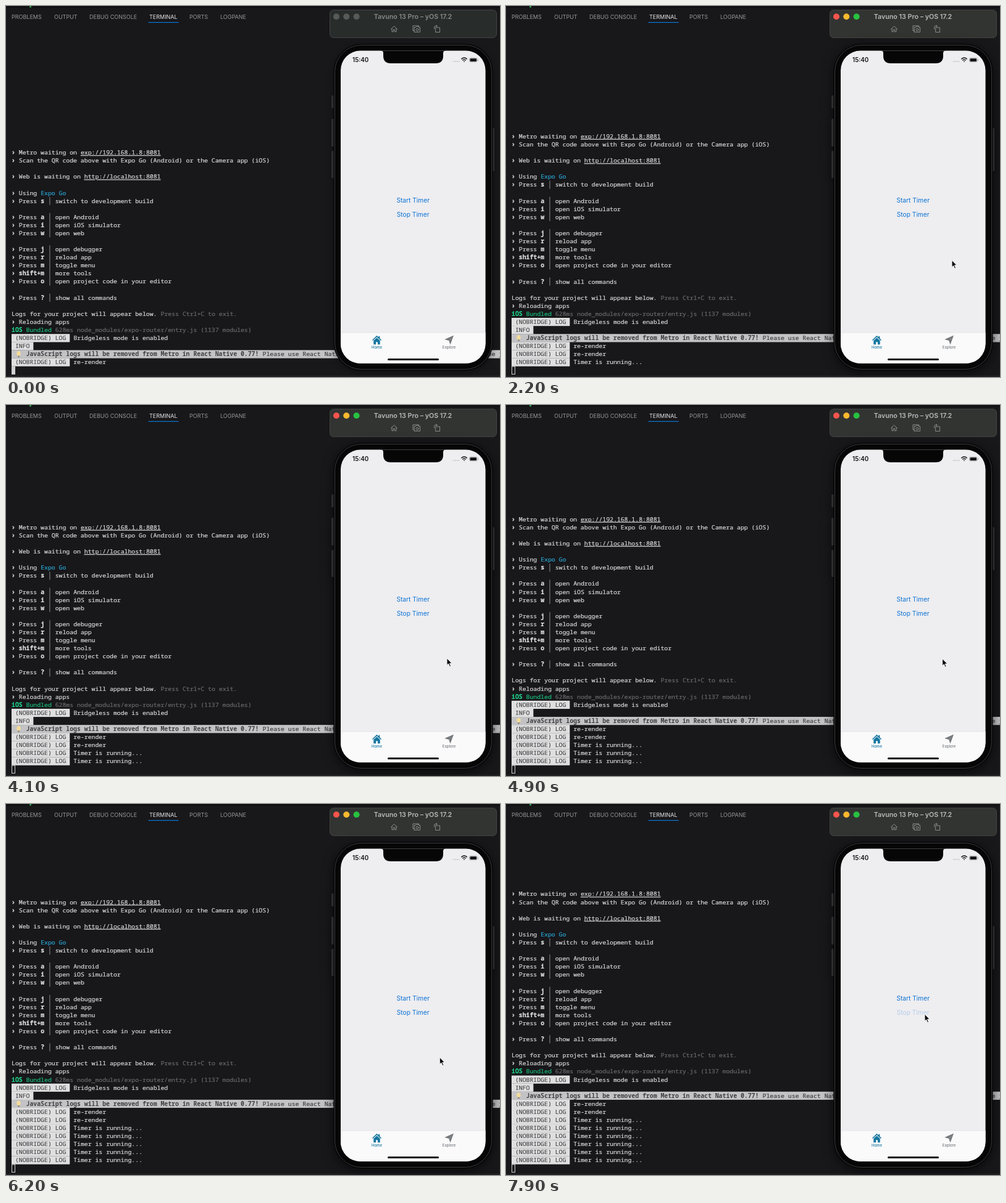
Write an HTML page that moves like this. It is 800 by 602 pixels and loops after 8 s.

```html
<!DOCTYPE html>
<html lang="en">
<head>
<meta charset="utf-8">
<title>Timer log</title>
<style>
  html, body { margin: 0; width: 100%; height: 100%; overflow: hidden; background: #18171a; }
  svg { display: block; width: 800px; height: 602px; }
  text { white-space: pre; font-family: Inter, "Open Sans", sans-serif; }
  .mid { text-anchor: middle; }
  .term text {
    font: 500 9.82px "Noto Sans Mono", "DejaVu Sans Mono", monospace;
    color: #d6d6d6; fill: currentColor; stroke: currentColor; stroke-width: .22px;
  }
  .term .b { font-weight: 700; color: #dedede; }
  .term .dim { color: #69696b; }
  .term .link { text-decoration: underline; }
  .term .cyan { color: #29a3cf; }
  .term .green { color: #17b978; }
  .term .ios { color: #1fd08a; font-weight: 700; }
  .term .tag { color: #4c4c4e; }
  .term .warn { color: #414144; font-weight: 700; stroke: none; }
  .term .note { color: #414144; }
  .tabs text { font-size: 9px; fill: #969698; }
  .tabs .on { fill: #e6e6e6; }
  .icons { fill: none; stroke: #929594; stroke-width: .9; stroke-linejoin: round; stroke-linecap: round; }
  .btn { font-size: 10.2px; fill: #0a73d5; }
</style>
</head>
<body>
<svg viewBox="0 0 800 602">
  <rect width="800" height="602" fill="#18171a"/>
  <rect width="800" height="3" fill="#111113"/>
  <rect x="38" width="3" height="2.5" fill="#2c9c4a"/>
  <rect y="600" width="800" height="1" fill="#29282b"/>
  <g class="tabs" id="tabs"></g>
  <rect x="230.5" y="26" width="49" height="1.2" fill="#0a78d4"/>

  <g class="term"><g id="rows"></g></g>
  <rect id="caret" x="9.5" y="585" width="5" height="12.500" stroke="#d0d0d0"/>

  <rect id="barFill" x="524.5" y="6.5" width="270" height="45" rx="6" stroke="#424443"/>
  <g id="lights"></g>
  <text id="title" class="mid" x="659" y="20.500" font-size="10.700" font-weight="600">Tavuno 13 Pro – yOS 17.2</text>
  <g class="icons">
    <path d="M623.5 37.5l5-4.800 5 4.800M625 36.500v5.300h2.400v-3.400h2.200v3.400h2.400v-5.300"/>
    <path d="M661.500 40h-2.500v-8h9.500v2M661.500 34.500h2l1-1.300h3l1 1.300h2v7.800h-9z"/>
    <circle cx="666" cy="38.400" r="2"/>
    <path d="M696 35h6.500v7.500h-6.500zM693.500 37v-2.500q0-2 2-2h2.500M696.600 31l1.600 1.500-1.600 1.500"/>
  </g>

  <g id="phone">
    <g fill="#2c2c2e">
      <rect x="527" y="145" width="5" height="21" rx="1.500"/>
      <rect x="527" y="183" width="5" height="45" rx="1.500"/>
      <rect x="527" y="235" width="5" height="44" rx="1.500"/>
      <rect x="787" y="198" width="4" height="70" rx="1.500"/>
    </g>
    <rect x="530.500" y="61.500" width="258" height="530" rx="45" fill="#060607"/>
    <rect x="532.500" y="63.500" width="254" height="526" rx="43" fill="none" stroke="#3a3a3d"/>
  </g>
  <clipPath id="screen"><rect x="542" y="72.500" width="234.500" height="507.500" rx="32"/></clipPath>
  <g clip-path="url(#screen)">
    <rect x="542" y="72" width="235" height="508" fill="#eeedf0"/>
    <rect x="542" y="530" width="235" height="50" fill="#fafafb"/>
    <rect x="542" y="529.700" width="235" height=".6" fill="#d9d9dc"/>
    <path d="M607 72v.5q4 0 4 4v4.500q0 12 12 12h73q12 0 12-12v-4.500q0-4 4-4v-.5z" fill="#060607"/>
  </g>
  <text x="561" y="91.300" font-size="9.800" font-weight="600" fill="#111">15:40</text>
  <g fill="#a9a9ad" id="dots"></g>
  <path d="M737.300 86.200q4.700-4.400 9.400 0" fill="none" stroke="#111" stroke-width="1.500"/>
  <path d="M739.200 88.300q2.800-2.600 5.600 0" fill="none" stroke="#111" stroke-width="1.300"/>
  <path d="M740.700 89.700q1.300-1 2.600 0l-1.300 1.400z" fill="#111"/>
  <rect x="750.500" y="84.300" width="12.500" height="6.600" rx="2" fill="none" stroke="#8b8b8e" stroke-width=".7"/>
  <rect x="751.500" y="85.200" width="10.500" height="4.800" rx="1.200" fill="#111"/>
  <rect x="763.700" y="86.500" width="1" height="2.200" rx=".5" fill="#8b8b8e"/>

  <text id="start" class="btn mid" x="659.200" y="318.700">Start Timer</text>
  <text id="stop" class="btn mid" x="659.200" y="341.500">Stop Timer</text>

  <g fill="#14769f">
    <path d="M600.500 534.800l2.800 2.600v-1.600h2v3.500l2.700 2.600-1 1-6.500-6-6.500 6-1-1z"/>
    <path d="M595.300 543l5.200-4.800 5.200 4.800v6.200h-3.700v-4h-3v4h-3.700z"/>
    <text class="mid" x="600.500" y="556" font-size="6" font-weight="500">Home</text>
  </g>
  <g fill="#76797c">
    <path d="M725 534.500l-5.500 15-2.300-6.600-7-2z"/>
    <path d="M717.200 542.900l4-4" stroke="#a6a8aa" stroke-width=".6"/>
    <text class="mid" x="717.600" y="556" font-size="6" font-weight="500">Explore</text>
  </g>
  <rect x="618" y="572" width="83" height="3" rx="1.500" fill="#0b0b0c"/>

  <path id="mouse" d="M0 0v11.300l2.600-2.400 2 4.600 1.900-.8-2-4.500h3.600z" fill="#0a0a0a" stroke="#fff" stroke-width=".9" stroke-linejoin="round"/>
</svg>
<script>
const CYCLE = 8000, TICK = 100;
const LEFT = 9, CELL = 5.892, LINE = 13.09, CARET_Y = 591.1;
const $ = id => document.getElementById(id);
const colX = col => LEFT + col * CELL;

const text = (x, y, str, cls = '') => `<text x="${x}" y="${y}" class="${cls}">${str}</text>`;
const box = (y, cols, fill) =>
  `<rect x="${LEFT}" y="${y - LINE / 2}" width="${cols * CELL}" height="${LINE + .1}" fill="${fill}"/>`;

// A row is a function of its centre line; parts are [column, text, class].
const line = (...parts) => y => parts.map(([c, s, k]) => text(colX(c), y + 3.4, s, k)).join('');
const prompt = (...parts) => line([0, '›', 'b'], ...parts);
const blank = () => '';
const key = (k, what) => y => {
  const label = k.length > 1 ? [[2, k, 'b']] : [[2, 'Press'], [8, k, 'b']];
  return prompt(...label, [12, what])(y) +
    `<rect x="${colX(10) + 2.5}" y="${y - LINE / 2}" width="1" height="${LINE + .1}" fill="#8c8c8e"/>`;
};
const log = msg => y => box(y, 16, '#dfdfe0') + line([1, '(NOBRIDGE) LOG', 'tag'], [17, msg])(y);
const warning = y => box(y, 135, '#c3c2c4') +
  `<ellipse cx="20.500" cy="${y - 1}" rx="3.200" ry="3.800" fill="#f2dc9a"/>` +
  `<rect x="19" y="${y + 2.5}" width="3" height="2.500" rx=".8" fill="#8e8a80"/>` +
  line([4, 'JavaScript logs will be removed from Metro in React Native 0.77!', 'warn'],
       [69, 'Please use React Native DevTools as your default tool. Tip: Type j', 'note'])(y);

const rows = [
  prompt([2, 'Metro waiting on'], [19, 'exp://192.168.1.8:8081', 'link']),
  prompt([2, 'Scan the QR code above with Expo Go (Android) or the Camera app (iOS)']),
  blank,
  prompt([2, 'Web is waiting on'], [20, 'http://localhost:8081', 'link']),
  blank,
  prompt([2, 'Using'], [8, 'Expo Go', 'cyan']),
  key('s', 'switch to development build'),
  blank,
  key('a', 'open Android'), key('i', 'open iOS simulator'), key('w', 'open web'),
  blank,
  key('j', 'open debugger'), key('r', 'reload app'), key('m', 'toggle menu'),
  key('shift+m', 'more tools'), key('o', 'open project code in your editor'),
  blank,
  key('?', 'show all commands'),
  blank,
  line([0, 'Logs for your project will appear below.'], [41, 'Press Ctrl+C to exit.', 'dim']),
  prompt([2, 'Reloading apps']),
  line([0, 'iOS', 'ios'], [4, 'Bundled', 'green'],
       [12, '628ms node_modules/expo-router/entry.js (1137 modules)', 'dim']),
  log('Bridgeless mode is enabled'),
  y => box(y, 6, '#dfdfe0') + line([1, 'INFO', 'tag'])(y),
  warning,
  log('re-render')
];
const firstCount = rows.length;
const logTimes = [1100, 2100, 3100, 4200, 5200, 6200, 7300];
logTimes.forEach((_, i) => rows.push(log(i ? 'Timer is running...' : 're-render')));
$('rows').innerHTML = rows.map((row, i) => `<g>${row(i * LINE)}</g>`).join('');
const rowNodes = [...$('rows').children];

$('tabs').innerHTML = [[9, 'PROBLEMS'], [78, 'OUTPUT'], [135, 'DEBUG CONSOLE'], [232, 'TERMINAL', 'on'],
  [297, 'PORTS'], [347, 'LOGPANE']].map(([x, s, k]) => text(x, 21.3, s, k)).join('');
$('lights').innerHTML = [535, 551.3, 567.6].map(x => `<circle cx="${x}" cy="17.300" r="5"/>`).join('');
$('dots').innerHTML = [0, 1, 2, 3].map(i => `<circle cx="${725 + i * 2.8}" cy="90" r=".8"/>`).join('');

// time, x, y
const mousePath = [
  [0, 737, -20], [100, 733, 0], [800, 679.5, 314], [1700, 679.5, 314], [2200, 722, 412.5],
  [3100, 722, 412.5], [3600, 718, 412], [3800, 718, 412], [4100, 714, 411], [4600, 708.5, 411],
  [4700, 707, 411.5], [5000, 706.5, 412], [5400, 703, 411], [5500, 703, 411], [5600, 702.3, 411],
  [6300, 702.3, 411], [6600, 710, 398], [7200, 684, 345.5], [7600, 678, 341], [8000, 678, 341]
];
const startFade = [[900, 1], [1000, .3], [1100, .2], [1200, .36], [1300, .7], [1400, .92], [1500, 1]];
const stopFade = [[7800, 1], [7900, .25]];

function sample(keys, t) {
  const next = keys.findIndex(k => k[0] > t);
  if (next === 0) return keys[0].slice(1);
  if (next < 0) return keys[keys.length - 1].slice(1);
  const a = keys[next - 1], b = keys[next];
  const p = (t - a[0]) / (b[0] - a[0]);
  const e = b[0] - a[0] >= 500 ? p * p * (3 - 2 * p) : p;
  return a.slice(1).map((v, i) => v + (b[i + 1] - v) * e);
}

function draw(t) {
  const count = firstCount + logTimes.filter(at => at <= t).length;
  rowNodes.forEach((node, i) => node.setAttribute('visibility', i < count ? 'visible' : 'hidden'));
  $('rows').setAttribute('transform', `translate(0 ${CARET_Y - count * LINE})`);

  const active = t >= 1000;
  $('caret').setAttribute('fill', active ? 'none' : '#d0d0d0');
  $('barFill').setAttribute('fill', active ? '#323432' : '#282d2b');
  $('title').setAttribute('fill', active ? '#b9bab9' : '#878a89');
  $('phone').style.filter = `drop-shadow(0 4px ${active ? 9 : 5}px rgba(0, 0, 0, ${active ? .6 : .35}))`;
  const colours = active ? ['#f9544d', '#f8b92e', '#28c140'] : Array(3).fill('#575a59');
  [...$('lights').children].forEach((c, i) => c.setAttribute('fill', colours[i]));

  $('start').setAttribute('opacity', sample(startFade, t)[0]);
  $('stop').setAttribute('opacity', sample(stopFade, t)[0]);
  const [x, y] = sample(mousePath, t);
  $('mouse').setAttribute('transform', `translate(${x} ${y})`);
}

const origin = performance.now();
function loop() {
  const t = (performance.now() - origin) % CYCLE;
  draw(Math.floor(t / TICK) * TICK);
  requestAnimationFrame(loop);
}
loop();
</script>
</body>
</html>
```
